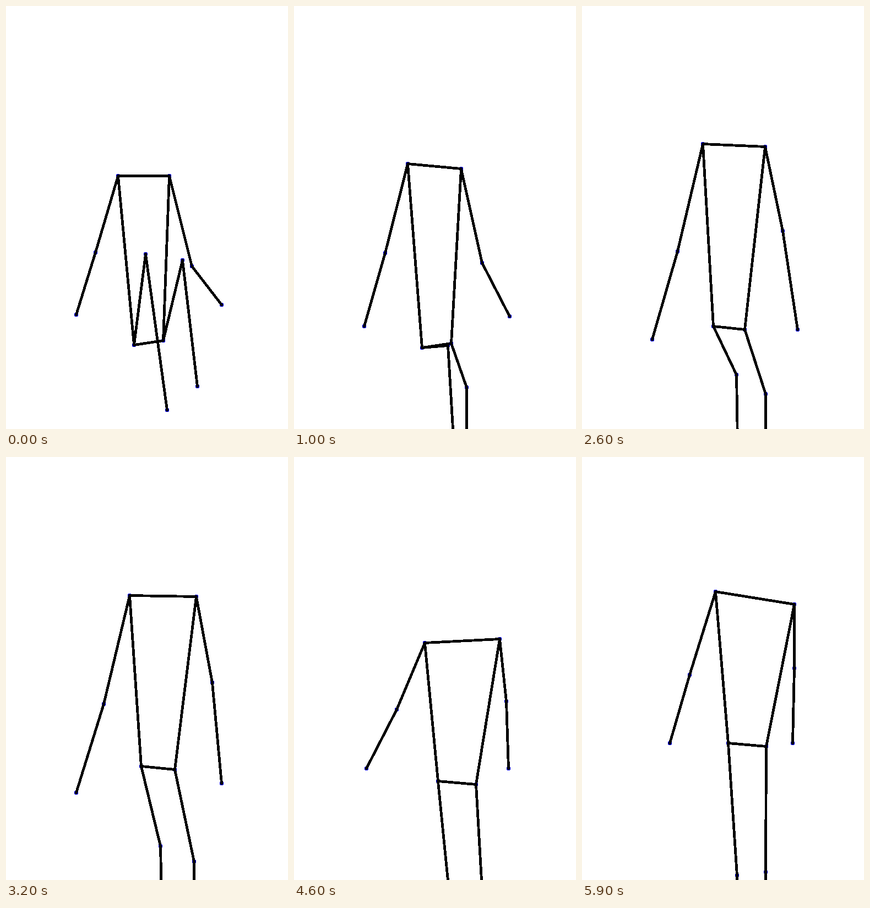
Recreate the animation shown at these times as an HTML page. Size 512 px wide and 768 px high, loop 6000 ms.

```html
<!DOCTYPE html>
<html lang="en">
<head>
<meta charset="utf-8">
<title>Stick figure</title>
<style>
  html, body { margin: 0; width: 100%; height: 100%; overflow: hidden; background: #fff; }
  svg { display: block; width: 100vw; height: 100vh; shape-rendering: crispEdges; }
  line { stroke: #000; stroke-width: 4.8; stroke-linecap: round; }
  circle { fill: #0000e0; }
</style>
</head>
<body>
<svg viewBox="0 0 512 768">
  <g id="dots" transform="translate(.5 .5)"></g>
  <g id="bones" transform="translate(.5 .5)"></g>
</svg>
<script>
  const LOOP = 6, STEP = 0.1; // seconds

  const clamp = k => Math.min(1, Math.max(0, k));
  const mix = (a, b, k) => a + (b - a) * k;

  // Eased move from a to b between two times
  function glide(t, a, b, start, end) {
    const k = clamp((t - start) / (end - start));
    return mix(a, b, k * k * (3 - 2 * k));
  }

  // Straight moves through a few [time, value] points
  function path(t, ...points) {
    let i = 1;
    while (i < points.length - 1 && t > points[i][0]) i++;
    const [t0, a] = points[i - 1], [t1, b] = points[i];
    return mix(a, b, clamp((t - t0) / (t1 - t0)));
  }

  function getPose(t) {
    const chest = path(t, [0, 308], [2.8, 246], [3.5, 255], [4.2, 327], [5.2, 352], [5.6, 314], [5.9, 244]);
    const tilt = path(t, [0, 0], [1.2, 11], [3.2, 2], [4, -16], [5.2, 1], [5.9, 23]);
    const waist = path(t, [0, 615], [1, 620], [2, 600], [3.2, 561], [4, 582], [5.2, 594], [5.9, 519]);
    const hands = path(t, [0, 560], [2, 601], [3.2, 609], [4, 593], [5.2, 537], [5.9, 519]);
    const twist = 0.14 * clamp(1 - Math.abs(t - 5.2) / 0.7);

    const shoulderL = [glide(t, 203, 242, 0, 6), chest];
    const shoulderR = [glide(t, 296, 385, 0, 6), chest + tilt];
    const wristL = [glide(t, 127, 159, 4.2, 5.9), hands];
    const wristR = [glide(t, 391, 382, 4.3, 5.4), hands + glide(t, -18, 0, 3, 4.2)];
    const elbowL = [162 + 33 * (t / 5.9) ** 1.3, mix(shoulderL[1], wristL[1], 0.55 - twist)];
    const elbowR = [glide(t, 337, 385, 0.2, 4.6),
                    mix(shoulderR[1], wristR[1], glide(t, 0.7, 0.46, 0.5, 2) + twist)];

    const hipL = [glide(t, 232, 265, 1.5, 5.4), waist];
    const hipR = [glide(t, 285, 334, 1.5, 5.3), waist + glide(t, -8, 6, 1, 2.6)];
    const kneeL = [path(t, [0, 253], [1, 279], [5.9, 281]),
                   path(t, [0, 450], [1, 616], [2, 632], [4, 755], [5.2, 800], [5.9, 759])];
    const kneeR = [path(t, [0, 320], [1, 313], [2, 324], [3.6, 347], [5.9, 333]),
                   path(t, [0, 461], [1, 692], [2, 673], [3.2, 734], [4, 800], [5.9, 753])];
    const ankleL = [kneeL[0] + glide(t, 39, 3, 0, 1.6), glide(t, 733, 850, 0, 1)];
    const ankleR = [kneeR[0] + glide(t, 27, 0, 0, 1), glide(t, 690, 850, 0, 1)];

    return { shoulderL, shoulderR, elbowL, elbowR, wristL, wristR,
             hipL, hipR, kneeL, kneeR, ankleL, ankleR };
  }

  const limbs = [
    ["shoulderL", "shoulderR"], ["hipL", "hipR"],
    ...["L", "R"].flatMap(side =>
      [["shoulder", "elbow"], ["elbow", "wrist"], ["shoulder", "hip"], ["hip", "knee"], ["knee", "ankle"]]
        .map(pair => pair.map(name => name + side)))
  ];

  function add(tag, parent) {
    const node = document.createElementNS("http://www.w3.org/2000/svg", tag);
    return document.getElementById(parent).appendChild(node);
  }

  function set(node, attrs) {
    for (const name in attrs) node.setAttribute(name, attrs[name]);
  }

  const dots = Object.keys(getPose(0)).map(name => ({ name, node: add("circle", "dots") }));
  const bones = limbs.map(([from, to]) => ({ from, to, node: add("line", "bones") }));

  function draw(t) {
    const pose = getPose(t);
    for (const name in pose) pose[name] = pose[name].map(Math.round);
    for (const { name, node } of dots) {
      const [cx, cy] = pose[name];
      set(node, { cx, cy, r: 3.9 });
    }
    for (const { from, to, node } of bones) {
      const [x1, y1] = pose[from], [x2, y2] = pose[to];
      set(node, { x1, y1, x2, y2 });
    }
  }

  function tick() {
    const t = performance.now() / 1000 % LOOP;
    draw(Math.floor(t / STEP) * STEP);
    requestAnimationFrame(tick);
  }
  tick();
</script>
</body>
</html>
```
